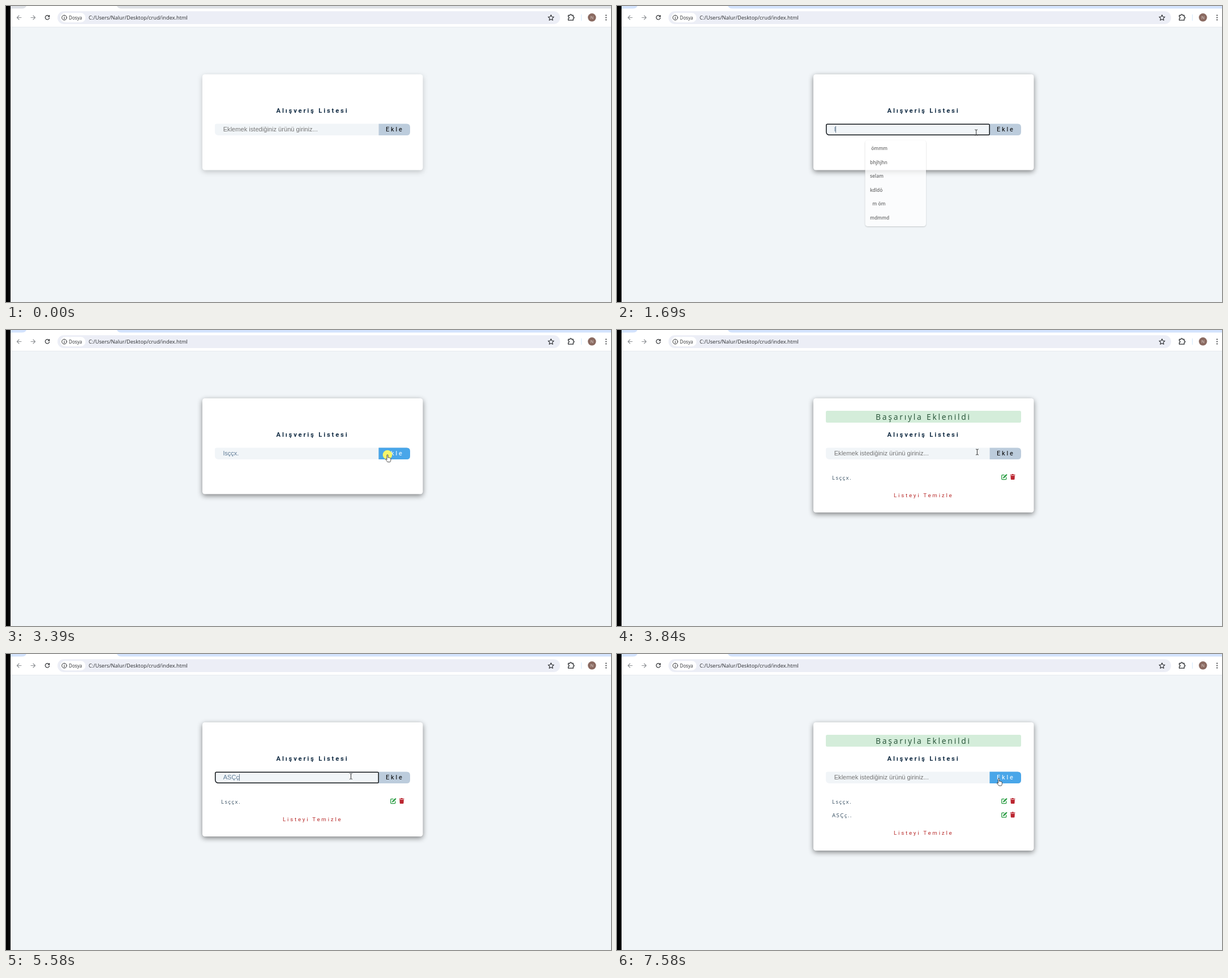
Write an HTML page that moves like this. It is 1069 px wide and 524 px high and loops after 8000 ms.

```html
<!DOCTYPE html>
<html lang="tr">
<head>
<meta charset="utf-8">
<title>Alışveriş Listesi</title>
<style>
  html, body { margin: 0; width: 100%; height: 100%; overflow: hidden; background: #f1f5f8; }
  svg { display: block; width: 100%; height: 100%; }
  text { white-space: pre; }
  .ui { font-family: "Open Sans", "Noto Sans", sans-serif; }
  .field { font: 11.1px "Liberation Sans", Arial, sans-serif; }
  .roboto { font-family: Roboto, sans-serif; letter-spacing: 2.78px; }
  .line { fill: none; stroke-linecap: round; stroke-linejoin: round; }
</style>
</head>
<body>
<svg viewBox="0 0 1069 524" preserveAspectRatio="none">
  <defs>
    <g id="icons">
      <g class="line" stroke="#259b3f" stroke-width="1.3">
        <path d="M684 256.6h-3.2q-1 0-1 1v6q0 1 1 1h6q1 0 1-1v-2.8"/>
        <path d="M683.4 261.2l4.6-4.6" stroke-width="2.5" stroke-linecap="butt"/>
        <path d="M682.9 261.7l.3-.3M688.3 256.3l.2-.2" stroke-width="1.8"/>
      </g>
      <path d="M694.8 256h2.5l.6-.9h2.5l.6.9h2.5v1.3h-8.7zM695.4 258h7.5l-.4 6.1q-.1 1-1 1h-4.700q-.9 0-1-1z" fill="#bb2530"/>
    </g>
  </defs>

  <!-- browser window -->
  <rect width="1069" height="524" fill="#f1f5f8"/>
  <rect x="8" width="1061" height="37" fill="#fff"/>
  <path id="strip" d="M8 0H36Q34 4.500 28 4.500H11Q8 4.500 8 7ZM196 0Q198 4.500 204 4.500H1069V0Z"/>
  <path d="M8 37.300H1069" stroke="#e4e8ec" stroke-width=".8"/>
  <g class="line" stroke="#8d9094" stroke-width="1.1">
    <path d="M27 20.500H19.500M23 17l-3.600 3.500 3.600 3.500"/>
    <path d="M44 20.500h7.500M48 17l3.600 3.500-3.600 3.500"/>
  </g>
  <path class="line" d="M76.300 18.600a3.700 3.700 0 1 0 .3 2.600M76.700 16.500v2.500h-2.500" stroke="#2b2d30" stroke-width="1.200"/>
  <rect x="91" y="9.300" width="888" height="22.700" rx="11.300" fill="#eceef6"/>
  <rect x="96" y="12.300" width="44.500" height="16.700" rx="8.300" fill="#fff"/>
  <circle class="line" cx="103" cy="20.600" r="4.300" stroke="#2b2d30"/>
  <path class="line" d="M103 20.400v2.300M103 18.500v.1" stroke="#2b2d30" stroke-width="1.100"/>
  <g class="ui" fill="#2b2d30">
    <text x="111" y="23.600" font-size="8.100" font-weight="500">Dosya</text>
    <text x="146" y="24" font-size="9.250">C:/Users/Nalur/Desktop/crud/index.html</text>
  </g>
  <path class="line" d="M963 15.800l1.500 3.200 3.500.4-2.600 2.400.7 3.500-3.100-1.800-3.100 1.800.7-3.500-2.600-2.400 3.500-.4z" stroke="#2b2d30" stroke-width="1.100"/>
  <path class="line" d="M993.500 16.500h3q0-1.900 1.400-1.900t1.400 1.900h2.900v2.800q1.700 0 1.700 1.400t-1.700 1.400v3.100h-8.700v-2.800q1.600-.3 1.600-1.600t-1.600-1.600z" stroke="#2b2d30" stroke-width="1.300"/>
  <path d="M1016.700 15v11" stroke="#cfe6fa"/>
  <circle cx="1035.300" cy="20.300" r="7.200" fill="#8a6a61"/>
  <text class="ui" x="1035.300" y="22.900" font-size="7" fill="#f0e6e2" text-anchor="middle">N</text>
  <path class="line" d="M1060.300 16.500v0M1060.300 20.500v0M1060.300 24.500v0" stroke="#2b2d30" stroke-width="2.200"/>
  <rect width="8" height="524"/>

  <!-- page -->
  <rect id="card" x="347" y="121" width="389.500" rx="4.500" fill="#fff"/>
  <g id="alert">
    <rect x="369" y="143" width="345" height="21" rx="2.500" fill="#d4edda"/>
    <text class="ui" x="457" y="159" font-size="13.900" letter-spacing="2.780" fill="#245035">Başarıyla Eklenildi</text>
  </g>
  <text class="roboto" x="477.500" y="188.600" font-size="11.300" font-weight="700" fill="#102a42">Alışveriş Listesi</text>

  <path d="M372 208.500H658.500V229H375.500Q369 229 369 222.500V211.500Q369 208.500 372 208.500Z" fill="#f1f5f8"/>
  <path d="M658.500 208.500H708Q714 208.500 714 214.500V223Q714 229 708 229H658.500Z" fill="#bcccdc"/>
  <text class="roboto" x="671" y="222.300" font-size="11.100">Ekle</text>
  <g id="hover">
    <path d="M658.500 208.500H708Q714 208.500 714 214.500V223Q714 229 708 229H658.500Z" fill="#49a6e9"/>
    <text class="roboto" x="671" y="222.300" font-size="11.100" fill="#fff">Ekle</text>
  </g>
  <path id="focus" class="line" d="M371.700 209.200H656.700Q658.200 209.200 658.200 210.700V226.800Q658.200 228.300 656.700 228.300H375.500Q369.800 228.300 369.800 222.500V211.200Q369.800 209.200 371.700 209.200Z" stroke="#101418" stroke-width="1.500"/>
  <text id="placeholder" class="field" x="383.700" y="222.400" fill="#757575">Eklemek istediğiniz ürünü giriniz...</text>
  <text id="value" class="field" x="383.700" y="222.400" fill="#617d98"></text>
  <path id="squiggle" class="line" stroke="#e0363c" stroke-width=".9"/>
  <rect id="caret" y="212.500" width=".8" height="12" fill="#445a70"/>

  <g class="ui" font-size="9.720" letter-spacing="1.390" fill="#385063">
    <g id="row1"><text x="380" y="264.800">Lsççx.</text><use href="#icons"/></g>
    <g id="row2"><text x="380" y="289.300">ASÇç..</text><use href="#icons" y="24.500"/></g>
  </g>
  <text id="clear" class="roboto" x="489" font-size="9.720" fill="#b82c2c">Listeyi Temizle</text>

  <g id="menu">
    <rect x="438.500" y="237.500" width="107.500" height="152.500" rx="4.500" fill="#fff" style="filter:drop-shadow(0 1px 1.2px rgba(0,0,0,.25))"/>
    <g id="options" class="ui" font-size="8.300" font-weight="600" fill="#454545"></g>
  </g>

  <circle id="click" r="8.300" fill="#f6f56b"/>
  <g id="cursor">
    <path id="arrow" d="M0 0V11l2.600-2.400 1.600 3.800 1.700-.7-1.600-3.700h3.600z" fill="#fff" stroke="#222" stroke-width=".8"/>
    <path id="beam" class="line" d="M-2-5Q0-5 0-4Q0-5 2-5M0-4V4M-2 5Q0 5 0 4Q0 5 2 5" stroke="#333" stroke-width="1"/>
    <path id="hand" d="M-1 8.500V.8a1 1 0 0 1 2 0V5q1-.8 1.800.3 1-.6 1.700.4 1.200-.3 1.400.9V9.500q0 1.800-1.200 3.200H.2Q-1.200 10.800-3.100 8.300q0-1.600 1.300-.8z" fill="#fff" stroke="#222" stroke-width=".8" stroke-linejoin="round"/>
  </g>
</svg>
<script>
const LOOP = 8000, BLINK = 530, TEXT_X = 383.7;
const $ = id => document.getElementById(id);
const show = (id, on) => { $(id).style.display = on ? '' : 'none'; };
const ramp = (t, from, to) => Math.min(1, Math.max(0, (t - from) / (to - from)));
const within = (t, spans) => spans.some(([from, to]) => t >= from && t < to);

// each visit to the field: focus, submit, end of the typed value, key presses
const visits = [
  { focus: 1320, blur: 3390, submit: 3580, keys: [[1640, 'l'], [1700, 's'], [1830, 'ç'], [2010, 'ç'], [2070, 'x'], [2130, '.']] },
  { focus: 4520, blur: 7330, submit: 7580, keys: [[4900, 'A'], [5040, 'S'], [5150, 'Ç'], [5390, 'ç'], [5710, '.'], [5890, '.']] }
];
const clicks = [[1250, 1500], [3390, 3580], [4450, 4710], [7330, 7580]];
// time, x, y
const path = [
  [250, 827, 360], [370, 696, 264], [450, 696, 264], [1060, 634.5, 224],
  [2680, 635, 224], [3200, 674, 221], [3710, 674, 221], [3840, 636.5, 216],
  [4210, 609.5, 216.5], [6400, 609.5, 216.5], [6820, 658, 219], [7140, 674.5, 220.5]
];

[' ömmm', 'bhjhjhn', 'selam', 'kdldö', '  m öm', 'mdmmd'].forEach((word, i) => {
  const option = document.createElementNS('http://www.w3.org/2000/svg', 'text');
  option.setAttribute('x', 447);
  option.setAttribute('y', 255.3 + i * 24.5);
  option.textContent = word;
  $('options').append(option);
});

let wave = `M${TEXT_X} 224.8`;
for (let i = 0; i < 14; i++) wave += `l2 ${i % 2 ? 1.5 : -1.5}`;
$('squiggle').setAttribute('d', wave);

function pointer(t) {
  const next = path.findIndex(p => p[0] > t);
  if (next < 0) return path[path.length - 1].slice(1);
  if (next === 0) return path[0].slice(1);
  const a = path[next - 1], b = path[next], k = ramp(t, a[0], b[0]);
  return [a[1] + (b[1] - a[1]) * k, a[2] + (b[2] - a[2]) * k];
}

function drawField(t) {
  const visit = visits.find(v => t >= v.focus && t < v.submit);
  const typed = visit ? visit.keys.filter(k => k[0] <= t) : [];
  const value = typed.map(k => k[1]).join('');
  const focused = Boolean(visit) && t < visit.blur;
  const lastInput = typed.length ? typed[typed.length - 1][0] : visit ? visit.focus : 0;
  $('value').textContent = value;
  show('placeholder', !value);
  show('focus', focused);
  show('caret', focused && (t - lastInput) % (2 * BLINK) < BLINK);
  $('caret').setAttribute('x', TEXT_X + (value ? $('value').getComputedTextLength() : 0));
  show('squiggle', t >= 5960 && t < 7330);

  const firstKey = visit ? visit.keys[0][0] : 0;
  $('menu').style.opacity = visit ? 1 - ramp(t, firstKey, firstKey + 220) : 0;
}

function drawList(t) {
  const count = visits.filter(v => t >= v.submit).length;
  show('row1', count > 0);
  show('row2', count > 1);
  show('clear', count > 0);
  $('clear').setAttribute('y', 271 + 24.5 * count);
  $('card').setAttribute('height', [169.5, 202, 227][count]);
  show('alert', visits.some(v => t >= v.submit && t < v.submit + 2000));
  const depth = 0.2 + 0.28 * ramp(t, 340, 640);
  $('card').style.filter = `drop-shadow(0 3.5px 4.8px rgba(0,0,0,${depth}))`;
}

function drawPointer(t) {
  const [x, y] = pointer(t);
  const inRow = y > 208 && y < 229 && x > 369 && x < 714;
  const shape = !inRow ? 'arrow' : x < 659 ? 'beam' : 'hand';
  for (const id of ['arrow', 'beam', 'hand']) show(id, id === shape);
  show('cursor', t >= 250);
  show('click', within(t, clicks));
  for (const id of ['cursor', 'click']) $(id).setAttribute('transform', `translate(${x} ${y})`);
  $('hover').style.opacity = ramp(t, 2990, 3110) - ramp(t, 3740, 3830) + ramp(t, 6850, 6990);
}

function draw(t) {
  $('strip').setAttribute('fill', t < 1320 ? '#dee1e6' : '#d3e3fd');
  drawField(t);
  drawList(t);
  drawPointer(t);
}

const start = performance.now();
function tick() {
  draw((performance.now() - start) % LOOP);
  requestAnimationFrame(tick);
}
tick();
</script>
</body>
</html>
```
